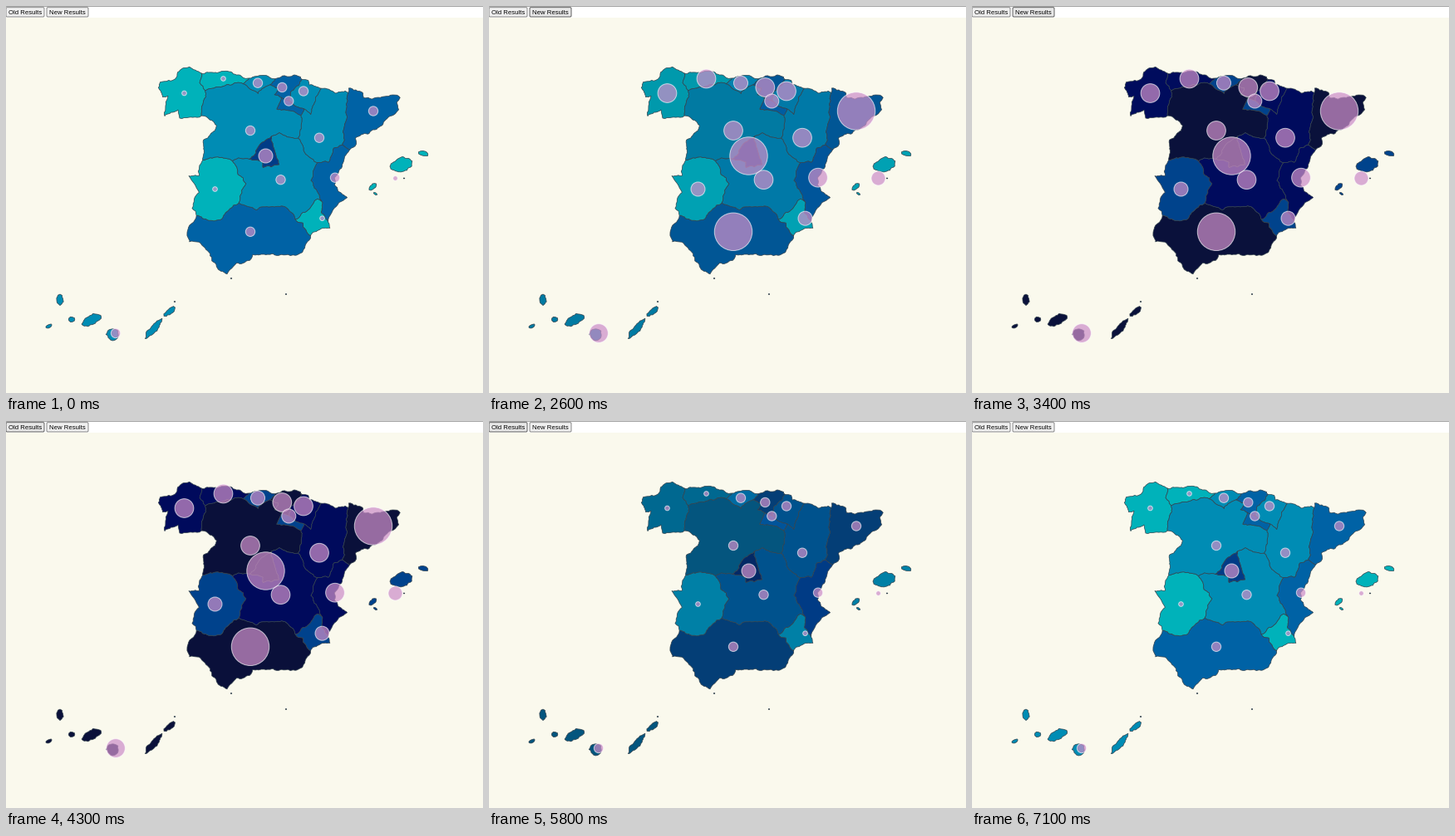
Write a matplotlib script that moves like this. It is 574 px wide and 466 px high and loops after 7200 ms.

```python
import math

import matplotlib.pyplot as plt
import numpy as np
from matplotlib.animation import FuncAnimation
from matplotlib.patches import Circle, FancyBboxPatch, Polygon, Rectangle

W, H, DPI = 574, 466, 100
PX = 72 / DPI
STEP, FRAMES = 100, 72
CLICK_NEW, CLICK_OLD = 2100, 5020
HOVER_NEW, HOVER_OLD = (1300, 3700), (4000, 5900)
RADIUS_TIME, COLOR_TIME = 500, 1500
RADIUS_UNIT = 2.84

TEAL, MID, BLUE, DEEP = (0, 178, 186), (0, 140, 180), (0, 98, 165), (0, 60, 135)
SKY, NAVY, NIGHT = (0, 66, 140), (0, 10, 92), (10, 16, 58)
SPECK = (45, 60, 75)

rng = np.random.default_rng(7)


def rgb(color):
    return np.array(color) / 255


def project(lon, lat):
    """Conformal conic projection to stage pixels."""
    psi = math.log(math.tan(math.pi / 4 + math.radians(lat) / 2))
    rho, theta = 3272 * math.exp(-.75 * psi), .75 * math.radians(lon + 5)
    return np.array([281.5 + rho * math.sin(theta), 73 + 1.01 * (rho * math.cos(theta) - 1725.9)])


def fractal(p, q):
    """Points from p up to, not including, q, by midpoint displacement."""
    side = q - p
    length = np.hypot(*side)
    if length < 3:
        return [p]
    normal = np.array([-side[1], side[0]])
    middle = (p + q) / 2 + normal * np.clip(rng.normal(0, .09), -2 / length, 2 / length)
    return fractal(p, middle) + fractal(middle, q)


def roughen(points):
    return [spot for p, q in zip(points, points[1:]) for spot in fractal(p, q)]


# Places where regions meet, as longitude and latitude
NODES = dict(
    A=(-7.04, 43.56), B=(-4.51, 43.39), C=(-3.15, 43.35), D=(-1.73, 43.3),
    E=(-.74, 42.92), F=(.66, 42.69), G=(3.17, 42.43), H=(.51, 40.52),
    I=(-.76, 37.85), J=(-1.63, 37.37), K=(-7.4, 37.18), L=(-7.1, 38.17),
    M=(-6.86, 40.27), N=(-6.98, 41.95), O=(-8.87, 41.88), P=(-6.82, 42.91),
    Q=(-4.84, 43.18), R=(-3.42, 43.13), S=(-2.86, 42.64), T=(-2.42, 42.49),
    U=(-1.68, 42.17), V=(-1.86, 41.93), W=(-2.05, 41.07), X=(-1.14, 40.11),
    Y=(.17, 40.73), Z=(-1.02, 38.65), a=(-2.34, 38.03), b=(-5.05, 38.68),
    c=(-5.37, 40.25), d=(-4.53, 40.32), e=(-3.4, 41.17), f=(-3.05, 40.1))
EDGES = {}


def edge(ends, *bends):
    """Border between two nodes, passing through a few bends."""
    points = [project(*p) for p in (NODES[ends[0]], *bends, NODES[ends[1]])]
    EDGES[ends] = roughen(points) + [points[-1]]
    EDGES[ends[::-1]] = EDGES[ends][::-1]


# Coasts
edge("AO", (-7.69, 43.79), (-8.3, 43.57), (-8.35, 43.38), (-9.2, 43.16),
     (-9.28, 42.95), (-9.03, 42.6), (-8.75, 42.65), (-8.85, 42.15))
edge("AB", (-5.85, 43.66))
edge("BC", (-3.78, 43.5))
edge("CD", (-2.75, 43.46), (-1.79, 43.39))
edge("GH", (3.32, 42.32), (3.12, 42.15), (3.18, 41.87), (2.1, 41.29), (.85, 40.95), (.87, 40.72))
edge("HI", (-.33, 39.5), (-.2, 39), (.23, 38.73), (-.5, 38.3), (-.65, 38.1))
edge("IJ", (-.69, 37.63), (-1.25, 37.57))
edge("JK", (-1.85, 37.1), (-2.2, 36.72), (-4.4, 36.72), (-4.65, 36.5), (-5.15, 36.42),
     (-5.6, 36), (-6.1, 36.28), (-6.4, 36.75), (-6.95, 37.18))
# Frontiers
edge("ON", (-8.2, 42.14), (-8.1, 41.83), (-7.2, 41.88))
edge("MN", (-6.85, 41.03), (-6.19, 41.58), (-6.55, 41.8))
edge("LM", (-7.32, 38.44), (-7, 39.05), (-7.53, 39.66), (-7.02, 39.68))
edge("KL", (-7.52, 37.55))
edge("DE", (-1.4, 43.25), (-1.35, 43.07))
edge("EF", (0, 42.7))
edge("FG", (.7, 42.86), (1.4, 42.65), (1.43, 42.45), (2.3, 42.4))
# Borders between regions
edge("PA", (-7.12, 43.2))
edge("PQ", (-6.2, 43.05))
edge("QR", (-4.05, 42.8), (-3.85, 42.98))
edge("RS", (-3, 43), (-3.2, 42.75))
edge("TD", (-2.2, 42.9))
edge("SV", (-3.1, 42.2))
edge("UE", (-1.35, 41.95))
edge("We", (-3, 41.3))
edge("ed", (-4.1, 40.75))
edge("fd", (-3.85, 40), (-3.85, 40.2))
edge("cM", (-6.1, 40.4))
edge("cb", (-5.1, 39.75), (-4.7, 39.4))
edge("bL", (-5.9, 38.05), (-6.5, 38))
edge("ba", (-4.2, 38.4), (-2.8, 38.5))
edge("aJ", (-1.98, 37.87))
edge("aZ", (-1.7, 38.35), (-1.2, 38.75))
edge("ZI", (-1.05, 38.2))
edge("ZX", (-1.25, 39.1), (-1.5, 39.45))
edge("XW", (-1.7, 40.45))
edge("XY", (-.6, 40.1), (-.3, 40.6))
edge("YF", (.35, 41.5))

fig = plt.figure(figsize=(W / DPI, H / DPI), dpi=DPI)
ax = fig.add_axes([0, 0, 1, 1])
ax.set(xlim=(0, W), ylim=(H, 0))
ax.axis("off")
ax.add_patch(Rectangle((0, 0), W, H, fc="white"))
ax.add_patch(Rectangle((0, 14.3), W, H - 14.3, fc=rgb((250, 249, 237))))
ax.add_patch(Rectangle((0, 0), W, 1, fc=rgb((165, 165, 165))))

land, bubbles = [], []


def add_land(points, old, new):
    patch = Polygon(points, closed=True, ec=(.2, .26, .3), lw=.7 * PX, joinstyle="round")
    land.append((ax.add_patch(patch), rgb(old), rgb(new)))


def add_island(x, y, length, width, angle, old, new):
    """Irregular rough ellipse; length and width are half axes."""
    turn = math.radians(angle)
    axis, across = np.array([(math.cos(turn), math.sin(turn)), (-math.sin(turn), math.cos(turn))])
    points = [np.array([x, y]) + rng.uniform(.85, 1.1)
              * (axis * length * math.cos(t) + across * width * math.sin(t))
              for t in np.arange(10) * math.tau / 10]
    add_land(roughen(points + points[:1]), old, new)


def add_bubble(x, y, old_level, new_level):
    dot = Circle((x, y), fc=(*rgb((205, 143, 202)), .72), ec=(1, 1, 1, .65), lw=PX, zorder=3)
    bubbles.append((ax.add_patch(dot), old_level * RADIUS_UNIT, new_level * RADIUS_UNIT))


def add_region(loop, old, new, *bubble):
    outline = []
    for start, end in zip(loop, loop[1:] + loop[0]):
        if start + end not in EDGES:
            edge(start + end)
        outline += EDGES[start + end][:-1]
    add_land(outline, old, new)
    add_bubble(*bubble)


add_region("AONP", TEAL, NAVY, 214.5, 105, 1, 4)
add_region("ABQP", TEAL, NAVY, 261.5, 87.5, 1, 4)
add_region("BCRQ", MID, SKY, 303, 92.7, 2, 3)
add_region("CDTSR", BLUE, NIGHT, 332.3, 98, 2, 4)
add_region("DEUT", MID, NAVY, 358, 102.5, 2, 4)
add_region("STUV", BLUE, SKY, 340.3, 114.5, 2, 3)
add_region("EFYXWVU", MID, NAVY, 377, 158.7, 2, 4)
add_region("FGHY", BLUE, NIGHT, 442, 126.5, 2, 8)
add_region("HIZXY", BLUE, NAVY, 396, 206.7, 2, 4)
add_region("IJaZ", TEAL, SKY, 380.5, 255.7, 1, 3)
add_region("JKLba", BLUE, NIGHT, 294, 271.8, 2, 8)
add_region("LMcb", TEAL, SKY, 251.5, 220.5, 1, 3)
add_region("MNPQRSVWedc", MID, NIGHT, 294, 150, 2, 4)
add_region("WefdcbaZX", MID, NAVY, 330.5, 209.2, 2, 4)
add_region("edf", DEEP, NIGHT, 312.5, 180.5, 3, 8)

# Balearic Islands
add_island(476, 191.5, 13, 9, -20, TEAL, SKY)
add_island(502.5, 177.5, 6.5, 3, 15, TEAL, SKY)
add_island(441.5, 217.5, 5.5, 3, -40, TEAL, SKY)
add_island(444.5, 226, 2.5, 1.2, 30, TEAL, SKY)
add_bubble(468.5, 207.5, 1, 3)
# Canary Islands
add_island(65, 354, 6.5, 4, 90, MID, NIGHT)
add_island(51.5, 385.5, 4.5, 2, -25, MID, NIGHT)
add_island(79, 377.5, 4, 3.2, 0, MID, NIGHT)
add_island(103, 377.5, 13, 5.5, -25, MID, NIGHT)
add_island(128.5, 395.5, 7.5, 7, 0, MID, NIGHT)
add_island(178, 388, 15, 3.8, -50, MID, NIGHT)
add_island(197, 368, 8.5, 3.5, -38, MID, NIGHT)
add_bubble(132, 394, 2, 4)
# Islets and enclaves
for x, y in ((271, 328), (337, 347), (479, 207.5), (203, 356)):
    add_island(x, y, .8, .5, 0, SPECK, SPECK)


def add_button(x, width, label):
    box = FancyBboxPatch((x + .5, 1.7), width - 1, 11.3, lw=.9 * PX,
                         boxstyle="round,pad=0,rounding_size=1.3")
    ax.text(x + width / 2, 10.1, label, ha="center", va="baseline",
            family="Liberation Sans", size=7.8 * PX, color="black")
    return ax.add_patch(box)


buttons = [(add_button(-.5, 47, "Old Results"), HOVER_OLD),
           (add_button(48.5, 51, "New Results"), HOVER_NEW)]


def ease(t):
    t = min(max(t, 0), 1)
    return 4 * t ** 3 if t < .5 else 1 - 4 * (1 - t) ** 3


def blend(now, duration):
    """0 shows the old results, 1 the new ones."""
    return ease((now - CLICK_NEW) / duration) - ease((now - CLICK_OLD) / duration)


def draw(frame):
    now = frame * STEP
    k = blend(now, COLOR_TIME)
    for patch, old, new in land:
        patch.set_facecolor(old + (new - old) * k)
    k = blend(now, RADIUS_TIME)
    for dot, small, big in bubbles:
        dot.set_radius(small + (big - small) * k)
    for box, (start, end) in buttons:
        hover = start <= now < end
        box.set_facecolor(rgb((232,) * 3 if hover else (240,) * 3))
        box.set_edgecolor(rgb((80,) * 3 if hover else (125,) * 3))
    return []


anim = FuncAnimation(fig, draw, frames=FRAMES, interval=STEP, repeat=True, repeat_delay=0)
plt.show()
```
